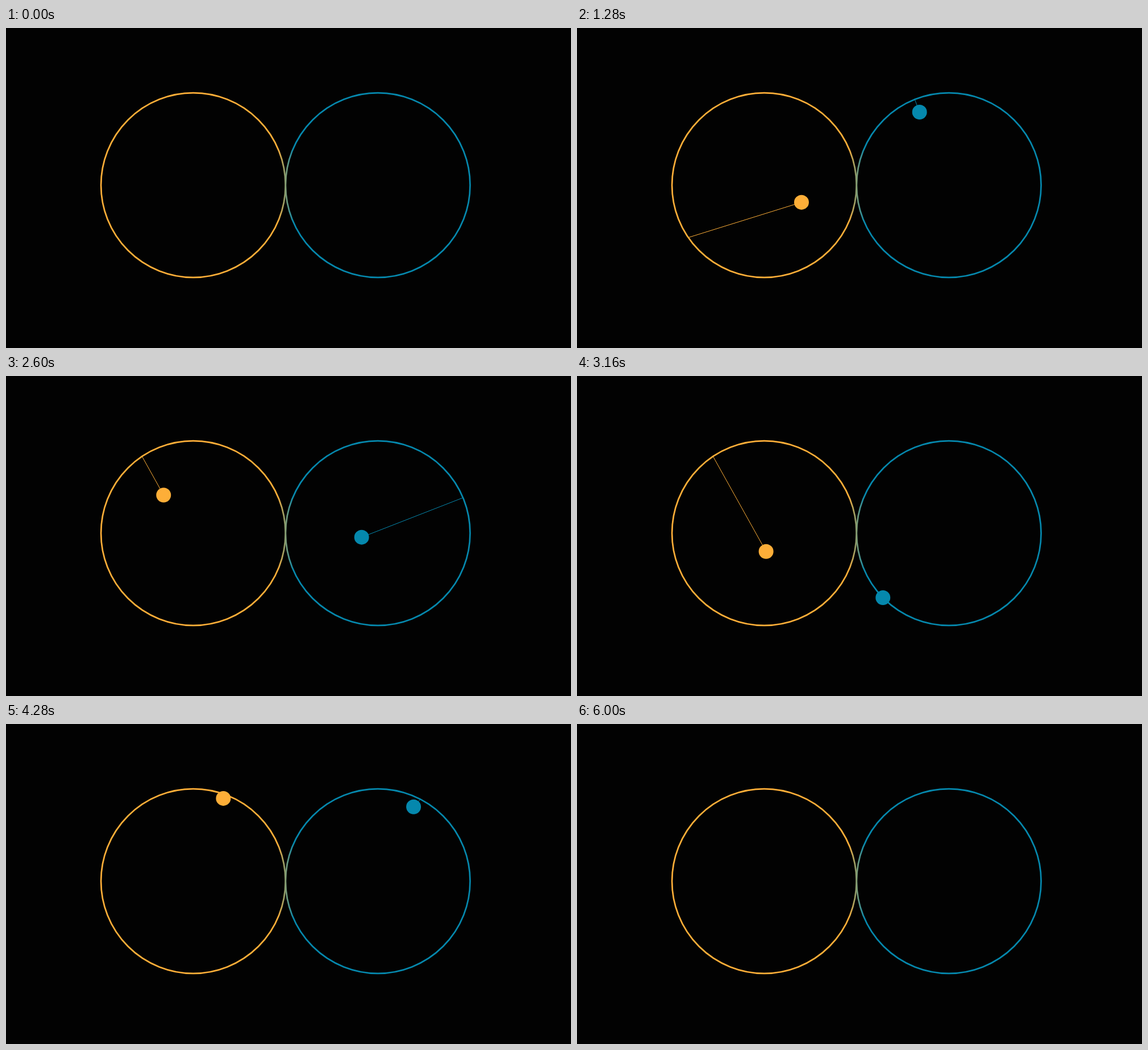
An HTML page with a canvas that plays this animation: 994x563 px, repeating every 6.04 s.

```html
<!DOCTYPE html>
<html>
<head>
<meta charset="utf-8">
<style>
html, body { margin: 0; width: 100%; height: 100%; overflow: hidden; background: #020202; }
canvas { display: block; }
</style>
</head>
<body>
<canvas id="stage" width="994" height="563"></canvas>
<script>
const ctx = document.getElementById('stage').getContext('2d');
const R = 162.3, CY = 276.5, BALL = 13;
const ORANGE = '#fdae38', BLUE = '#0588ad';
const LEFT = { x: 329.4, color: ORANGE }, RIGHT = { x: 654.2, color: BLUE };

// Chords as [from, to] angles in degrees, one entry per cycle
const slow = [[145.4, 0], [-123.7, 65.4], [-69.3, 139.9]];
const fastA = [[195, 30.2], [-22.6, 160], [-62.6, 145.6]];
const fastB = [[-111.7, 70.1], [135.6, -45], [60.7, -78.6]];

const ringPaint = ctx.createLinearGradient(478, 0, 506, 0);
ringPaint.addColorStop(0, ORANGE);
ringPaint.addColorStop(1, BLUE);

const clamp = v => Math.min(1, Math.max(0, v));
const mix = (a, b, f) => ({ x: a.x + (b.x - a.x) * f, y: a.y + (b.y - a.y) * f });

function onRing(ring, deg) {
  const a = deg * Math.PI / 180;
  return { x: ring.x + R * Math.cos(a), y: CY + R * Math.sin(a) };
}

function drawRing(ring) {
  ctx.strokeStyle = ringPaint;
  ctx.lineWidth = 2.7;
  ctx.beginPath();
  ctx.arc(ring.x, CY, R, 0, 2 * Math.PI);
  ctx.stroke();
}

// A ball pops in, crosses the ring with a line behind it, and pops out
function drawTrip(ring, [from, to], n, start, length, leave) {
  const size = Math.min(clamp((n - start + 4) / 2), clamp((leave + 3 - n) / 3));
  if (size <= 0) return;
  const f = clamp((n - start) / length);
  const a = onRing(ring, from), b = onRing(ring, to);
  const ball = mix(a, b, f), tail = mix(a, b, clamp((f - 0.7) / 0.3));
  ctx.strokeStyle = ctx.fillStyle = ring.color;
  ctx.lineWidth = 1;
  ctx.beginPath();
  ctx.moveTo(tail.x, tail.y);
  ctx.lineTo(ball.x, ball.y);
  ctx.stroke();
  ctx.beginPath();
  ctx.arc(ball.x, ball.y, BALL * size, 0, 2 * Math.PI);
  ctx.fill();
}

function draw(ms) {
  // 24 poses a second shown at 25 a second: one pose is held twice
  const k = Math.floor(ms % 6040 / 40);
  const pose = k - Math.floor((k + 24) / 25);
  const n = pose % 48, cycle = Math.floor(pose / 48) % 3;
  ctx.fillStyle = '#020202';
  ctx.fillRect(0, 0, 994, 563);
  drawRing(LEFT);
  drawRing(RIGHT);
  if (n > 1) {
    drawTrip(LEFT, slow[cycle], n, 5.1, 37, 44.8);
    drawTrip(RIGHT, fastA[cycle], n, 5.15, 15, 20.5);
    drawTrip(RIGHT, fastB[cycle], n, 28.9, 15, 44.8);
  }
}

const began = performance.now();
function tick() {
  draw(performance.now() - began);
  requestAnimationFrame(tick);
}
tick();
</script>
</body>
</html>
```
